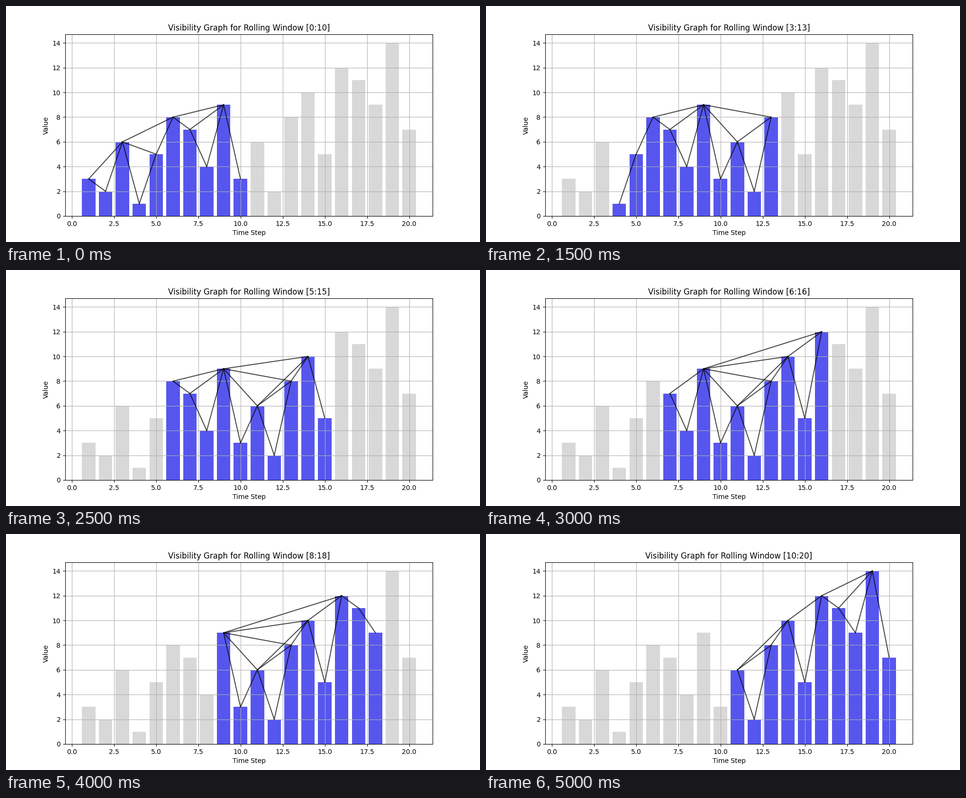
A matplotlib script for the animation above (5500 ms loop, 1000 px wide and 500 px high).

```python
from itertools import combinations

import matplotlib.pyplot as plt
from matplotlib.animation import FuncAnimation

VALUES = [3, 2, 6, 1, 5, 8, 7, 4, 9, 3, 6, 2, 8, 10, 5, 12, 11, 9, 14, 7]
STEPS = range(1, len(VALUES) + 1)
WINDOW = 10


def sees(i, j):
    """True if every bar between i and j stays below their sight line."""
    slope = (VALUES[j] - VALUES[i]) / (j - i)
    return all(VALUES[k] < VALUES[i] + slope * (k - i) for k in range(i + 1, j))


fig, ax = plt.subplots(figsize=(10, 5), dpi=100)
ax.bar(STEPS, VALUES, color="gray", alpha=0.3)
active = ax.bar(STEPS, VALUES, color="blue", alpha=0.6)

edges = []
for i, j in combinations(range(len(VALUES)), 2):
    if j - i < WINDOW and sees(i, j):
        line, = ax.plot([i + 1, j + 1], [VALUES[i], VALUES[j]],
                        color="black", lw=1.5, alpha=0.7)
        edges.append((i, j, line))

ax.set_xlim(-0.39, 21.39)
ax.set_ylim(0, 14.7)
ax.set_xlabel("Time Step")
ax.set_ylabel("Value")
ax.grid(True)
title = ax.set_title("")


def update(start):
    end = start + WINDOW
    for k, bar in enumerate(active):
        bar.set_visible(start <= k < end)
    for i, j, line in edges:
        line.set_visible(start <= i and j < end)
    title.set_text(f"Visibility Graph for Rolling Window [{start}:{end}]")
    return [title]


anim = FuncAnimation(fig, update, frames=len(VALUES) - WINDOW + 1,
                     interval=500, repeat=True, repeat_delay=0)
plt.show()
```
